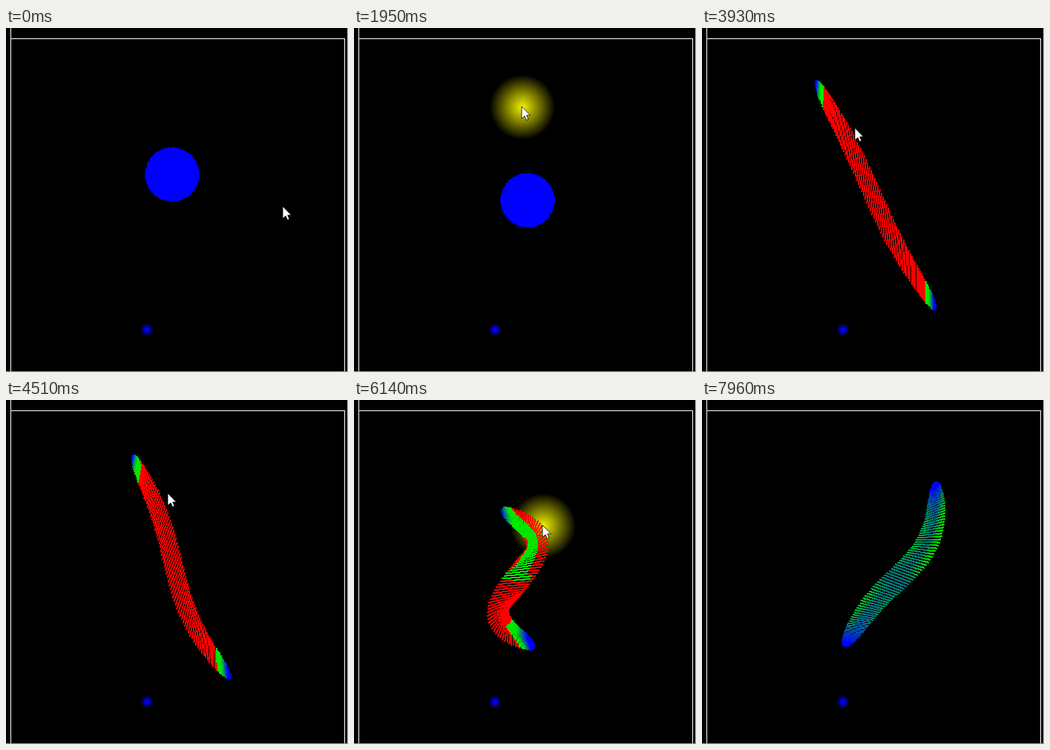
These frames come from a looping animation (461x465 px, 8 s). An HTML page with a canvas:

```html
<!DOCTYPE html>
<html lang="en">
<head>
<meta charset="utf-8">
<title>Soft body</title>
<style>
html, body { margin: 0; width: 100%; height: 100%; overflow: hidden; background: #000; }
canvas { display: block; width: 461px; height: 465px; }
</style>
</head>
<body>
<canvas id="stage" width="461" height="465"></canvas>
<script>
const g = document.getElementById('stage').getContext('2d');
const { PI, sin, cos, abs, min, max, floor, round, hypot, atan2 } = Math;
const LOOP = 8000, HOLD = 550, STEP = 57.88;
const LINES = 80, DOTS = 42, RADIUS = 36;
const LAUNCH = 2930, PEAK = 3380, END = 7950;

const clamp = x => min(1, max(0, x));
const mix = (a, b, k) => a + (b - a) * k;
const smooth = k => k * k * (3 - 2 * k);

// A pose is two ends of the body plus the size of its S and C bends.
const disc = (t, x, y) => ({ t, v: [x - 22, y - 28.5, x + 22, y + 28.5, 0, 0] });
const pose = (t, ...v) => ({ t, v });
const poses = [
  disc(1290, 224, 198),
  disc(1940, 234, 233),
  disc(LAUNCH, 234, 233),
  pose(PEAK, 146, 96, 364, 371, 0, 0),
  pose(3850, 151, 74, 317, 378, 3, 3),
  pose(4500, 170, 77, 303, 374, 9, 10),
  pose(5400, 158, 93, 262, 362, 20, 4),
  pose(6110, 199, 152, 243, 331, 34, 0),
  pose(7150, 345, 134, 206, 318, -20, 30),
  pose(END, 314, 111, 193, 333, 12, -22)
];

const stop = (t, x, y) => ({ t, v: [x, y] });
const cursorStops = [
  stop(550, 373, 241), stop(950, 416, 1), stop(1290, 226, 106), stop(1990, 226, 106),
  stop(2170, 436, 10), stop(3050, 425, 84), stop(3380, 196, 142), stop(4500, 218, 126),
  stop(5430, 281, 336), stop(5600, 281, 336), stop(6110, 254, 169), stop(6700, 329, 115)
];

function sample(track, t, ease = k => k) {
  let i = 0;
  while (i < track.length - 2 && t > track[i + 1].t) i++;
  const a = track[i], b = track[i + 1];
  const k = ease(clamp((t - a.t) / (b.t - a.t)));
  return a.v.map((x, j) => mix(x, b.v[j], k));
}

// The spine: a chord bent sideways. p runs from -1 to 1.
function makeSpine([x0, y0, x1, y1, sBend, cBend]) {
  const hx = (x1 - x0) / 2, hy = (y1 - y0) / 2, half = hypot(hx, hy);
  const spine = {
    at(p) {
      const off = (sBend * sin(PI * p) + cBend * (1 - p * p)) / half;
      return [x0 + hx * (p + 1) - hy * off, y0 + hy * (p + 1) + hx * off];
    },
    heading(p) {
      const slope = (sBend * PI * cos(PI * p) - 2 * cBend * p) / half;
      return atan2(hy + hx * slope, hx - hy * slope);
    },
    curve: p => -2 * cBend - sBend * PI * PI * sin(PI * p),
    length: 0
  };
  for (let p = -1; p < 0.99; p += 0.1) {
    const [ax, ay] = spine.at(p), [bx, by] = spine.at(p + 0.1);
    spine.length += hypot(bx - ax, by - ay);
  }
  return spine;
}

function strainColor(w) {
  if (w > 0.74) return '#f00';
  const k = clamp(w * 2);
  return `rgb(0,${round(230 * k)},${round(255 * (1 - k))})`;
}

function drawBody(t) {
  const spine = makeSpine(sample(poses, t));
  const rise = clamp((t - LAUNCH) / (PEAK - LAUNCH));
  const calm = clamp((t - PEAK) / (END - PEAK));
  // The area stays the same, so a shorter body is wider.
  const width = min(RADIUS, 4100 / spine.length);
  const shear = mix(mix(90, 28, rise), 65, calm) * PI / 180;
  const reach = width / sin(shear);
  for (let i = 0; i < LINES; i++) {
    const s = 2 * (i + 0.5) / LINES - 1;
    const p = s * (1 + 0.3 * rise * (1 - s * s));
    const [x, y] = spine.at(p);
    const angle = spine.heading(p) + shear;
    const dx = reach * cos(angle), dy = reach * sin(angle);
    const strain = mix(1.4, 0.25, calm) - mix(1.8, 0.4, calm) * s ** 4
      + 0.2 * sin(5 * s) * sin(PI * calm);
    for (let j = 0; j < DOTS; j++) {
      const v = 2 * (j + 0.5) / DOTS - 1;
      if (s * s + v * v > 1) continue;
      const bend = -spine.curve(p) * v / 500;
      g.fillStyle = strainColor(rise * (strain + abs(bend) + 0.5 * bend));
      g.fillRect(round(x + dx * v - 1), round(y + dy * v - 1), 2, 2);
    }
  }
}

function glow(x, y, r, rgb, core = 0) {
  const fill = g.createRadialGradient(x, y, 0, x, y, r);
  fill.addColorStop(core, `rgba(${rgb},0.95)`);
  fill.addColorStop(1, `rgba(${rgb},0)`);
  g.fillStyle = fill;
  g.fillRect(x - r, y - r, 2 * r, 2 * r);
}

const arrow = new Path2D('M0 0V16.5L4 13L6.5 18.5L9 17.5L6.7 12H11.5Z');

function drawCursor(x, y) {
  g.save();
  g.translate(round(x), round(y));
  g.fillStyle = '#fff';
  g.fill(arrow);
  g.strokeStyle = '#000';
  g.lineWidth = 0.8;
  g.stroke(arrow);
  g.restore();
}

function bar(x, y, w, h, color) {
  g.fillStyle = color;
  g.fillRect(x, y, w, h);
}

function draw(t) {
  bar(0, 0, 461, 465, '#000');
  bar(6, 0, 1, 465, '#fff');
  bar(6, 14, 451, 1, '#fff');
  bar(456, 14, 1, 451, '#fff');
  bar(460, 0, 1, 465, '#bbb');
  bar(0, 464, 461, 1, '#999');
  glow(190, 408, 9, '0,0,255', 0.2);
  const [x, y] = sample(cursorStops, t, smooth);
  const pressed = (t >= 1290 && t < 1990) || (t >= 5500 && t < 7000);
  if (pressed) glow(x + 1, y + 1, 44, '255,255,0');
  drawBody(t);
  if (t < 7090) drawCursor(x, y);
}

function tick(now) {
  const t = now % LOOP;
  draw(t < HOLD ? 0 : HOLD + floor((t - HOLD) / STEP) * STEP);
  requestAnimationFrame(tick);
}
requestAnimationFrame(tick);
</script>
</body>
</html>
```
